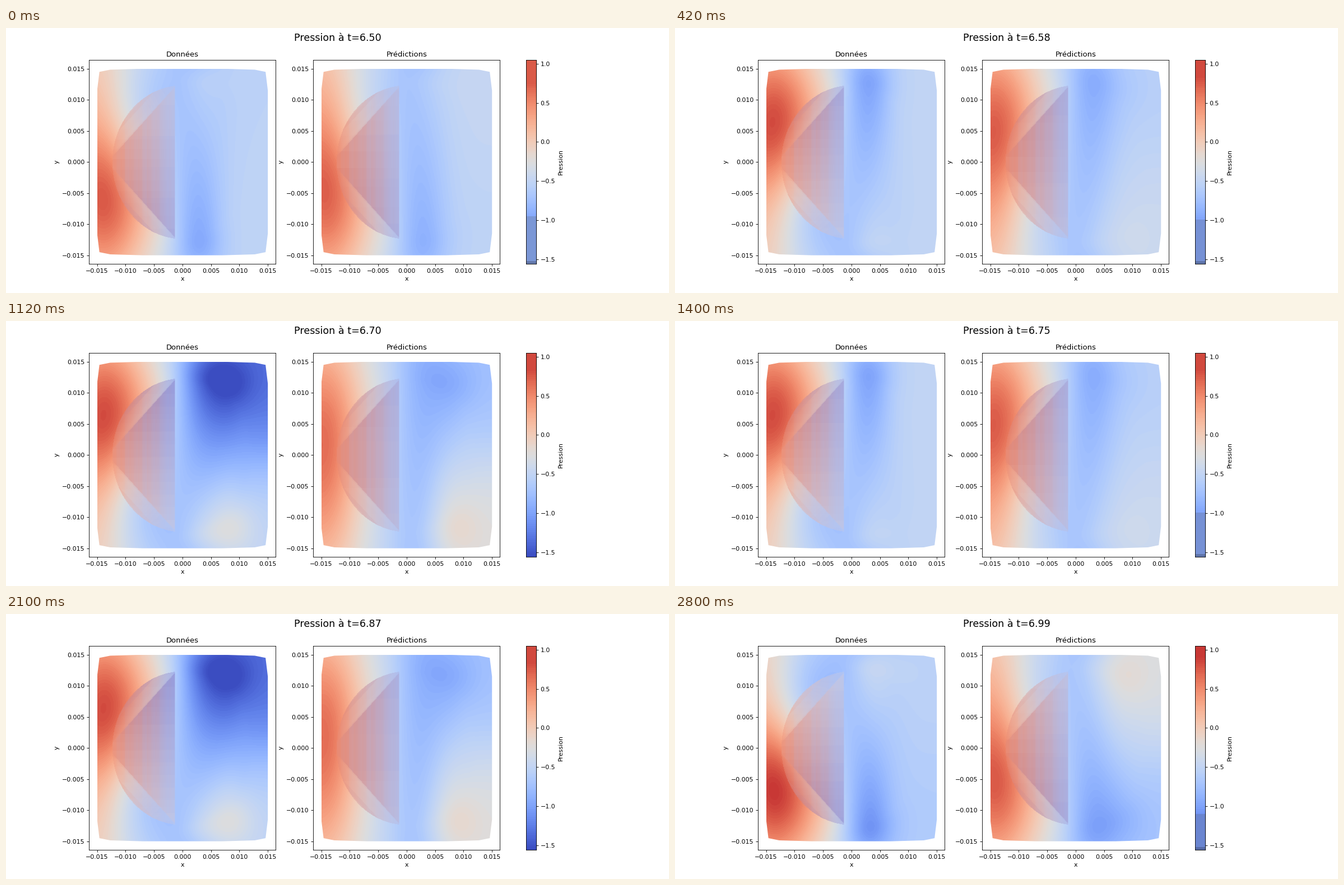
Write a matplotlib script that moves like this. It is 1183 px wide and 473 px high and loops after 2940 ms.

```python
import numpy as np
import matplotlib
import matplotlib.pyplot as plt
from matplotlib.animation import FuncAnimation
from matplotlib.patches import Polygon

W, H = 1183, 473
DPI = W / 15
FRAMES = 21
PERIOD = 17            # one shedding cycle, in hundredths of a time unit
RADIUS = 12.4          # cylinder, mm
VMIN, VMAX = -1.559, 1.047
LEVELS = 100
CMAP = matplotlib.colormaps["coolwarm"]

# sway: swing of the front pressure; shed: strength of the passing vortices
DATA = dict(sway=.95, sharp=1.4, sway_lag=1, shed=1, shed_lag=-1, power=2,
            drop=.45, front=1.08)
MODEL = dict(sway=.85, sharp=.5, sway_lag=2.2, shed=.65, shed_lag=0, power=0,
             drop=0, front=1.15)


def bell(x, y, x0, y0, wx, wy):
    return np.exp(-((x - x0) / wx) ** 2 - ((y - y0) / wy) ** 2)


def pressure(x, y, phase, flow):
    def wave(lag):
        return np.cos(2 * np.pi * (phase - lag) / PERIOD)

    sway = -flow["sway"] * np.tanh(flow["sharp"] * wave(flow["sway_lag"]))
    c = wave(flow["shed_lag"])
    shed = flow["shed"] * c * abs(c) ** flow["power"]
    side, height = np.sign(y), abs(y)

    rest = (-.5 - .28 * np.exp(-((x - 2) / 5) ** 2)
            + flow["front"] * bell(x, y, -15, 0, 7.7, 22))
    tilt = .7 * y / 9 * np.exp(.5 - .5 * (y / 9) ** 2
                               - ((x + 10) / 9) ** 2)
    shoulder = side * bell(x, height, 3, 12.5, 4, 4)
    wake = 1 / (1 + np.exp(-(x - 4) / 2))
    vortex = (.45 * np.tanh(y / 7) * wake
              + .3 * side * bell(x, height, 8, 11.5, 4.5, 4.5))
    return (rest + sway * (tilt - .42 * shoulder)
            + shed * vortex - flow["drop"] * c * c * wake)


def bridged(x, y, phase, flow):
    """Straight blend between the wall points above and below (x, y)."""
    wall = np.sqrt(np.maximum(RADIUS ** 2 - x * x, .01))
    w = np.clip(.5 + .5 * y / wall, 0, 1)
    return (w * pressure(x, wall, phase, flow)
            + (1 - w) * pressure(x, -wall, phase, flow))


NX, NY = 304, 333
gx, gy = np.meshgrid(np.linspace(-15, 15, NX), np.linspace(-15, 15, NY))
inside = np.hypot(gx, gy) < RADIUS

# overlapping sheets on the left half of the cylinder
rng = np.random.default_rng(4)
left = inside & (gx < -1.4)
lens = left & (abs(gy) > 1 + (gx + 12.3) * 1.02)
u = np.clip((gx + 12.3) / 10.9, 0, 1)
strip = np.clip((gx + 12.5) * 1.3, 0, 39).astype(int)
slant = ((abs(gy) - gx) * 1.1 % 40).astype(int)
core_mix = np.clip(.9 - .75 * u + rng.uniform(-.04, .04, 40)[strip], 0, 1)
lens_mix = .55 + rng.uniform(-.1, .1, 40)[slant]


def shade(v):
    n = (v - VMIN) / (VMAX - VMIN)
    return CMAP((np.floor(np.clip(n, 0, .999) * LEVELS) + .5) / LEVELS)[..., :3]


def blend(a, top, under):
    return a[..., None] * top + (1 - a[..., None]) * under


def picture(f, phase, flow):
    rgb = shade(f)
    front = shade(pressure(-12.3, gy * .25, phase, flow))
    back = shade(bridged(np.full_like(gy, .5), gy, phase, flow))
    sheet = blend(core_mix, front, back)
    both = blend(lens_mix, sheet, rgb)
    rgb[left] = sheet[left]
    rgb[lens] = both[lens]
    return rgb


bar_v = np.linspace(VMIN, VMAX, 364)


def bar_picture(lo, hi):
    rgb = shade(np.clip(bar_v, lo, hi))
    if lo > -1.35:
        rgb[bar_v < lo] = rgb[bar_v < lo] * .78 + .07
        rgb[bar_v < -1.53] *= .8
    return rgb[:, None]


fig = plt.figure(figsize=((W + .01) / DPI, (H + .01) / DPI), dpi=DPI)
title = fig.suptitle("", fontsize=16)

corner = np.array([(15, 0), (15, 11.5), (14.6, 14.5), (12.7, 14.85), (7, 15)])
half = np.vstack([corner, corner[::-1] * (-1, 1)])
outline = np.vstack([half, -half]) / 1000


def add_axes(x, width):
    return fig.add_axes([x / W, 51.8 / H, width / W, 364 / H])


def panel(x, name):
    ax = add_axes(x, 333)
    im = ax.imshow(np.ones((NY, NX, 3)), origin="lower", aspect="auto",
                   extent=[-.015, .015, -.015, .015],
                   interpolation="bilinear")
    im.set_clip_path(Polygon(outline, transform=ax.transData))
    ticks = np.arange(-3, 4) * .005
    ax.set(xlim=(-.0164, .0164), ylim=(-.0164, .0164), xticks=ticks,
           yticks=ticks, xlabel="x", ylabel="y", title=name)
    return im


panels = [(panel(148.4, "Données"), DATA), (panel(548.4, "Prédictions"), MODEL)]

cax = add_axes(927.8, 18.2)
bar = cax.imshow(np.ones((364, 1, 3)), origin="lower", aspect="auto",
                 extent=[0, 1, VMIN, VMAX], interpolation="nearest")
cax.yaxis.tick_right()
cax.yaxis.set_label_position("right")
cax.set(xticks=[], yticks=np.arange(-3, 3) * .5, ylabel="Pression")


def draw(k):
    step = -(-49 * k // 20)
    phase = step - 13
    title.set_text(f"Pression à t={6.5 + step / 100:.2f}")
    lows, highs = [], []
    for im, flow in panels:
        f = np.where(inside, bridged(gx, gy, phase, flow),
                     pressure(gx, gy, phase, flow))
        im.set_data(picture(f, phase, flow))
        lows.append(f.min())
        highs.append(f.max())
    bar.set_data(bar_picture(min(lows), max(highs)))
    return [title, bar] + [im for im, _ in panels]


anim = FuncAnimation(fig, draw, frames=FRAMES, interval=140,
                     init_func=lambda: draw(0), repeat=True, repeat_delay=0)
plt.show()
```
